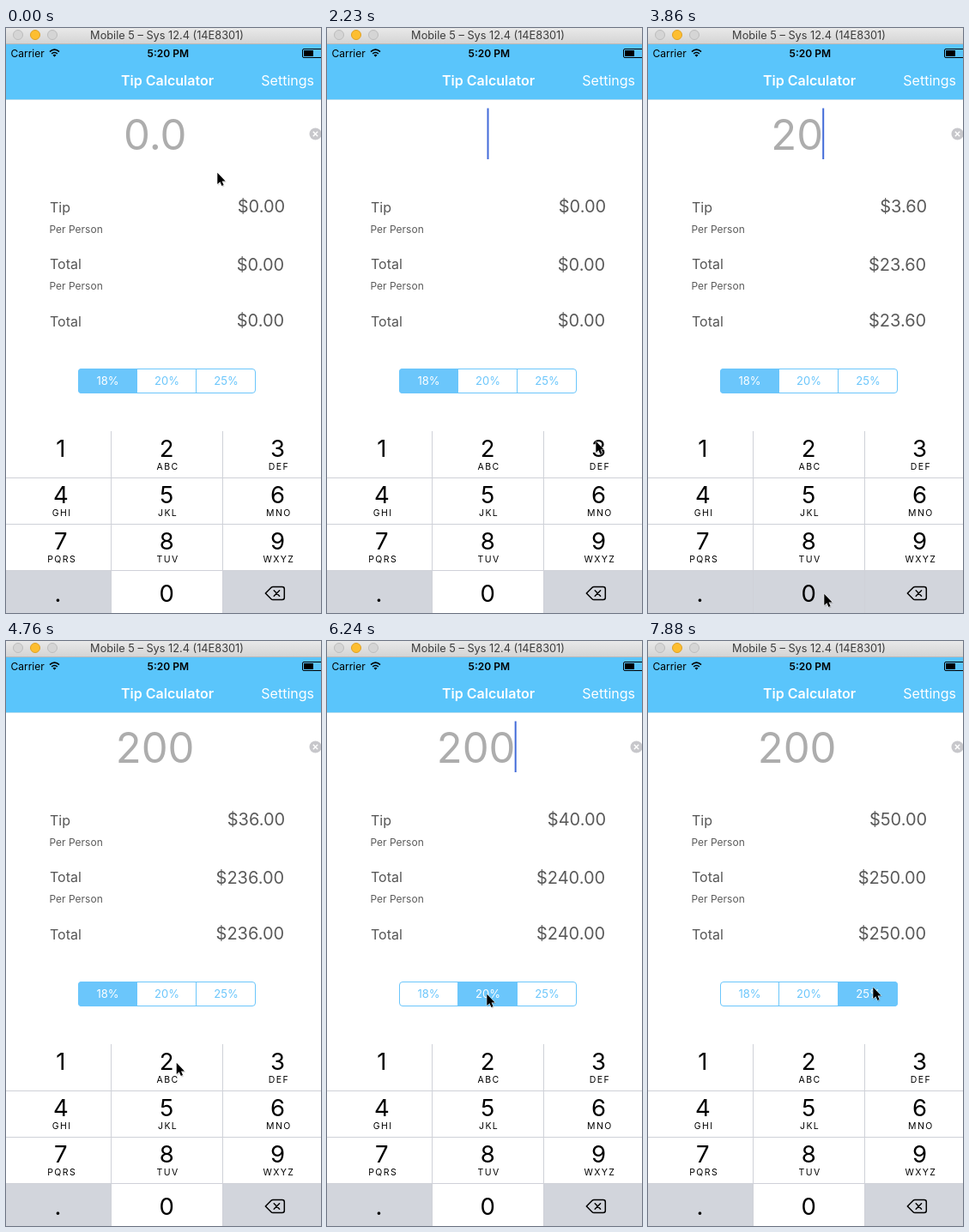
An HTML page for the animation above (8000 ms loop, 367 by 682 pixels).

```html
<!DOCTYPE html>
<html lang="en">
<head>
<meta charset="utf-8">
<title>Tip Calculator</title>
<style>
  html, body { margin: 0; width: 100%; height: 100%; overflow: hidden; background: #fff; }
  svg { display: block; width: 367px; height: 682px; font-family: Inter, "Open Sans", sans-serif; }
  .mid { text-anchor: middle; }
  .end { text-anchor: end; }
  .label { font-size: 16px; fill: #555; }
  .small { font-size: 12px; fill: #5c5c5c; }
  .amount { font-size: 20px; fill: #5a5a5a; text-anchor: end; }
  .digit { font-size: 27.5px; text-anchor: middle; }
  .letters { font-size: 10.5px; letter-spacing: 1.4px; text-anchor: middle; }
</style>
</head>
<body>
<svg viewBox="0 0 367 682" xmlns="http://www.w3.org/2000/svg">
  <defs>
    <linearGradient id="chrome" x2="0" y2="1">
      <stop offset="0" stop-color="#e9e9e9"/>
      <stop offset="1" stop-color="#d3d3d3"/>
    </linearGradient>
    <clipPath id="pill"><rect x="84" y="397" width="207" height="29" rx="4"/></clipPath>
  </defs>
  <rect width="367" height="682" fill="#fff"/>

  <!-- window bar -->
  <rect width="367" height="19" fill="url(#chrome)"/>
  <rect y="18" width="367" height="1" fill="#bcb9b8"/>
  <circle cx="14" cy="8" r="5.5" fill="#d5d5d5" stroke="#bdbdbd"/>
  <circle cx="34" cy="8" r="5.5" fill="#fdbe30" stroke="#dfa125"/>
  <circle cx="54" cy="8" r="5.5" fill="#d5d5d5" stroke="#bdbdbd"/>
  <text class="mid" x="187.5" y="13" font-size="12.75" fill="#3c3c3c">Mobile 5 – Sys 12.4 (14E8301)</text>

  <!-- status and navigation -->
  <rect y="19" width="367" height="64" fill="#5ac5fb"/>
  <rect y="83" width="367" height="1" fill="#b4dcef"/>
  <text x="5.5" y="33.5" font-size="12">Carrier</text>
  <path d="M51 27.6Q56.5 22.6 62 27.6M53.1 30Q56.5 27 59.9 30" fill="none" stroke="#000" stroke-width="1.6"/>
  <path d="M54.5 31.6Q56.5 30 58.5 31.6L56.5 33.8Z"/>
  <text class="mid" x="188.8" y="33.5" font-size="12" font-weight="600">5:20 PM</text>
  <rect x="345.5" y="24.5" width="25" height="10" rx="1.5" fill="none" stroke="#000"/>
  <rect x="347" y="26" width="11" height="7"/>
  <text class="mid" x="188" y="67" font-size="16" font-weight="600" fill="#fff">Tip Calculator</text>
  <text class="end" x="359" y="67" font-size="16" fill="#fff">Settings</text>

  <!-- bill field -->
  <text id="bill" class="mid" x="173.7" y="142" font-size="49" fill="#adadad"></text>
  <g id="clear">
    <circle cx="360.5" cy="123.5" r="7" fill="#c7c7cb"/>
    <path d="M357.8 120.8L363.2 126.2M363.2 120.8L357.8 126.2" stroke="#fff" stroke-width="1.4"/>
  </g>
  <rect id="caret" y="93.5" width="2" height="59.5" fill="#426bd9"/>

  <!-- results -->
  <text class="label" x="51" y="215">Tip</text>
  <text class="small" x="50.5" y="238.5">Per Person</text>
  <text class="label" x="51" y="281">Total</text>
  <text class="small" x="50.5" y="304.5">Per Person</text>
  <text class="label" x="51" y="348">Total</text>
  <text id="tip" class="amount" x="325.2" y="215"></text>
  <text id="total" class="amount" x="324.2" y="283"></text>
  <text id="grand" class="amount" x="324.2" y="347.5"></text>

  <g id="segments" clip-path="url(#pill)"></g>
  <rect x="84.5" y="397.5" width="206" height="28" rx="3.5" fill="none" stroke="#6bc6fb"/>

  <g id="keys"></g>
  <path d="M0 524.5H367M0 578.5H367M0 632.5H367M122.5 470V682M252.5 470V682" fill="none" stroke="#cfd1d8"/>
  <g id="caps"></g>
  <g fill="none" stroke="#000" stroke-width="1.5" stroke-linejoin="round" stroke-linecap="round">
    <path d="M302.3 659L309 652.2Q309.8 651.4 311 651.4H321.8Q324.3 651.4 324.3 653.9V664.1Q324.3 666.6 321.8 666.6H311Q309.8 666.6 309 665.8Z"/>
    <path d="M312.2 655.8L318.6 662.2M318.6 655.8L312.2 662.2"/>
  </g>

  <g id="pointer">
    <path d="M.8 2V16L4.2 13L6.2 17.6L8.6 16.6L6.6 12H11Z" opacity=".15"/>
    <path d="M.3 .8V14L3.4 11.2L5.4 15.9L7.6 14.9L5.6 10.4H9.6Z" stroke="#fff" paint-order="stroke"/>
  </g>
</svg>
<script>
const NS = "http://www.w3.org/2000/svg";
const LOOP = 8000, TICK = 1040 / 7;
const BLUE = "#6bc6fb", GREY = "#d2d5dc";
const RATES = [18, 20, 25];
const $ = id => document.getElementById(id);

function add(parent, tag, attrs, text = "") {
  const el = document.createElementNS(NS, tag);
  for (const k in attrs) el.setAttribute(k, attrs[k]);
  el.textContent = text;
  return parent.appendChild(el);
}

const LETTERS = ["", "ABC", "DEF", "GHI", "JKL", "MNO", "PQRS", "TUV", "WXYZ"];
const MIDS = [63.8, 187.2, 316.5];
const keys = [..."123456789.0", ""].map((cap, i) => {
  const c = i % 3, x = MIDS[c], top = 470 + Math.floor(i / 3) * 54;
  const rect = add($("keys"), "rect", { x: 130 * c - 7, y: top, width: 130, height: 54 });
  add($("caps"), "text", { class: "digit", x: cap === "." ? 60.5 : x, y: top + (i > 8 ? 37 : 30) }, cap);
  if (LETTERS[i]) add($("caps"), "text", { class: "letters", x: x + 1.4, y: top + 45 }, LETTERS[i]);
  return rect;
});

const segments = RATES.map((rate, i) => {
  const x = 84 + 69 * i;
  const rect = add($("segments"), "rect", { x: x - 1, y: 397, width: 70, height: 29 });
  add($("segments"), "rect", { x: x - 1, y: 397, width: 1, height: 29, fill: BLUE });
  const text = add($("segments"), "text", { class: "mid", x: x + 34.5, y: 416, "font-size": 13 }, rate + "%");
  return { rect, text };
});

// pointer moves, in ticks
const MOVES = [
  { from: 0, to: 7, x: 361, y: 122 },
  { from: 9, to: 15, x: 313, y: 481 },
  { from: 17, to: 19, x: 230, y: 488 },
  { from: 21, to: 26, x: 205, y: 659 },
  { from: 31, to: 33, x: 197, y: 455 },
  { from: 34, to: 40, x: 186, y: 411 },
  { from: 42, to: 47, x: 237, y: 403 },
  { from: 47, to: 53, x: 262, y: 403 }
];
const EDITS = [
  { at: -6, text: "0.0" },
  { at: 7, text: "" },
  { at: 21, text: "2", key: 1 },
  { at: 26, text: "20", key: 10 },
  { at: 28, text: "200" }
];

const easeOut = f => 1 - (1 - f) ** 2.5;
const money = v => "$" + v.toFixed(2);

function pointerAt(n) {
  let x = 246, y = 168;
  for (const m of MOVES) {
    const f = easeOut(Math.max(0, Math.min(1, (n - m.from) / (m.to - m.from))));
    x += (m.x - x) * f;
    y += (m.y - y) * f;
  }
  return [x, y];
}

function draw(ms) {
  const n = Math.floor((ms + 5) / TICK);
  const { at, text, key } = EDITS.filter(e => e.at <= n).pop();
  const chosen = n < 42 ? 0 : n < 51 ? 1 : 2;
  const bill = Number(text), tip = bill * RATES[chosen] / 100;

  $("bill").textContent = text;
  $("clear").setAttribute("visibility", text ? "visible" : "hidden");
  const width = text && Math.max(58, $("bill").getComputedTextLength());
  $("caret").setAttribute("x", text ? 172.8 + width / 2 : 186.5);
  $("caret").setAttribute("opacity", (n - at) % 7 < 4 ? 1 : 0);
  $("tip").textContent = money(tip);
  $("total").textContent = $("grand").textContent = money(bill + tip);

  segments.forEach(({ rect, text }, i) => {
    rect.setAttribute("fill", i === chosen ? BLUE : "#fff");
    text.setAttribute("fill", i === chosen ? "#fff" : BLUE);
  });

  const pressed = n - at < 2 ? key : -1;
  keys.forEach((k, i) => k.setAttribute("fill", i === 9 || i === 11 || i === pressed ? GREY : "#fff"));
  $("pointer").setAttribute("transform", `translate(${pointerAt(n)})`);
}

const start = performance.now();
function loop() {
  draw((performance.now() - start) % LOOP);
  requestAnimationFrame(loop);
}
loop();
</script>
</body>
</html>
```
